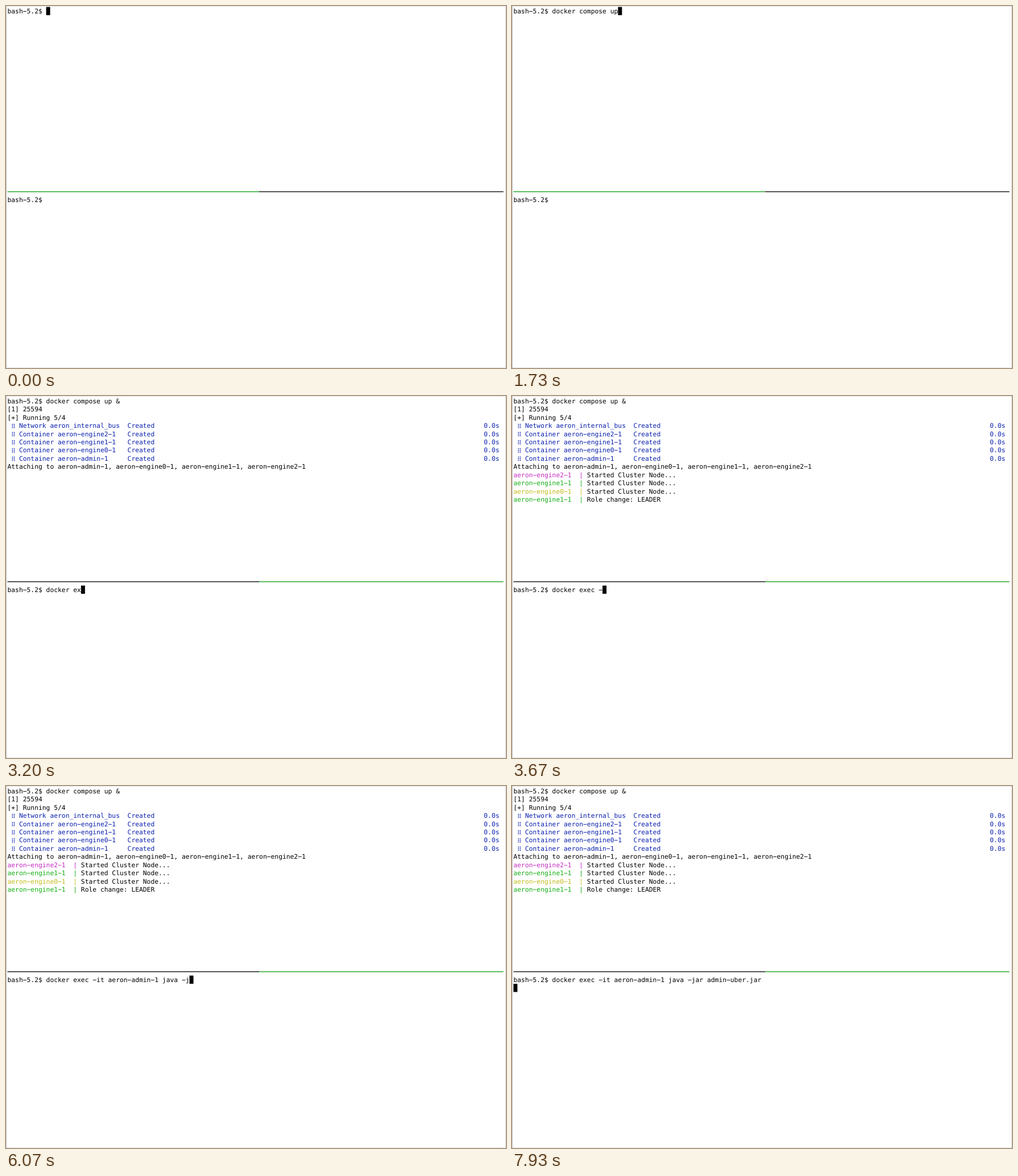
Recreate the animation shown at these times as an HTML page with a canvas. Size 879 by 637 pixels, loop 8000 ms.

```html
<!DOCTYPE html>
<html lang="en">
<head>
<meta charset="utf-8">
<title>Terminal session</title>
<style>
html, body { margin: 0; width: 100%; height: 100%; overflow: hidden; background: #fff; }
canvas { display: block; }
</style>
</head>
<body>
<canvas id="stage" width="879" height="637"></canvas>
<script>
const ctx = document.getElementById('stage').getContext('2d');
const W = 879, H = 637, LOOP = 8000, TICK = 200 / 3;
const LEFT = 2.5, TOP = 1.7, COL = 6.809, ROW = 14.43;
const SPLIT_ROW = 23;
const BLACK = '#000', BLUE = '#0a20ae', GREEN = '#14ae14',
      YELLOW = '#c3bb1c', MAGENTA = '#c52cc3';
const PROMPT = 'bash-5.2$ ';

// Typing bursts as [first tick, number of keys]; a key takes 1.5 ticks.
const upper = {
  text: 'docker compose up &',
  bursts: [[2, 13], [22, 6]]
};
const lower = {
  text: 'docker exec -it aeron-admin-1 java -jar admin-uber.jar',
  bursts: [[35, 1], [37, 1], [39, 9], [53, 8], [65, 7], [76, 19], [105, 9]]
};
const AT = { enter: 31, swap: 34, created: 38, started: 52, leader: 55, run: 119 };

const parts = [
  ['Network aeron_internal_bus'],
  ['Container aeron-engine2-1'],
  ['Container aeron-engine1-1'],
  ['Container aeron-engine0-1'],
  ['Container aeron-admin-1']
].flat();
const nodes = [
  ['aeron-engine2-1', MAGENTA],
  ['aeron-engine1-1', GREEN],
  ['aeron-engine0-1', YELLOW]
];

function box(x, y, w, h, color) {
  ctx.fillStyle = color;
  ctx.fillRect(x, y, w, h);
}

function write(text, col, row, color = BLACK) {
  ctx.fillStyle = color;
  const y = TOP + row * ROW + 11.2;
  [...text].forEach((ch, i) => {
    // The minus glyph gives the long terminal dash.
    if (ch !== ' ') ctx.fillText(ch === '-' ? '\u2212' : ch, LEFT + (col + i) * COL, y);
  });
}

function cursor(col, row) {
  box(LEFT + col * COL, TOP + row * ROW, COL + 0.2, ROW, BLACK);
}

function dots(row) {
  for (let i = 0; i < 6; i++) {
    box(10.6 + (i % 2) * 3.2, TOP + row * ROW + 4 + (i >> 1) * 2.8, 1.6, 1.6, BLUE);
  }
}

function typed({ text, bursts }, tick) {
  let n = 0;
  for (const [start, keys] of bursts) {
    for (let i = 0; i < keys; i++) {
      if (start + Math.floor(i * 1.5) <= tick) n++;
    }
  }
  return PROMPT + text.slice(0, n);
}

function logLine([name, color], message, row) {
  write(name + '  |', 0, row, color);
  write(message, 19, row);
}

function drawFrame() {
  box(0, 0, W, H, '#fff');
  box(0, 0, W, 1, '#e4e4e4');
  box(0, H - 1, W, 1, '#e4e4e4');
  box(0, 0, 1, H, '#bcbcbc');
  box(W - 1, 0, 1, H, '#d2d2d2');
}

function drawSplit(swapped) {
  box(2.5, 326, 442.5, 1.5, swapped ? '#222' : '#2ea82e');
  box(445, 326, 429.5, 1.5, swapped ? '#2ea82e' : '#222');
}

function drawUpper(tick) {
  const line = typed(upper, tick);
  write(line, 0, 0);
  if (tick < AT.enter) {
    cursor(line.length, 0);
    return;
  }
  write('[1] 25594', 0, 1);
  if (tick < AT.created) {
    write(PROMPT, 0, 2);
    if (tick < AT.swap) cursor(PROMPT.length, 2);
    return;
  }
  write('[+] Running 5/4', 0, 2);
  parts.forEach((name, i) => {
    const row = 3 + i;
    dots(row);
    write(name, 3, row, BLUE);
    write('Created', 31, row, BLUE);
    write('0.0s', 123, row, BLUE);
  });
  write('Attaching to aeron-admin-1, aeron-engine0-1, aeron-engine1-1, aeron-engine2-1', 0, 8);
  if (tick >= AT.started) {
    nodes.forEach((node, i) => logLine(node, 'Started Cluster Node...', 9 + i));
  }
  if (tick >= AT.leader) logLine(nodes[1], 'Role change: LEADER', 12);
}

function drawLower(tick) {
  const line = typed(lower, tick);
  write(line, 0, SPLIT_ROW);
  if (tick >= AT.run) cursor(0, SPLIT_ROW + 1);
  else if (tick >= AT.swap) cursor(line.length, SPLIT_ROW);
}

function render() {
  const tick = Math.floor((performance.now() % LOOP + 3.5) / TICK);
  ctx.font = '11.31px "DejaVu Sans Mono", monospace';
  ctx.textBaseline = 'alphabetic';
  ctx.textRendering = 'geometricPrecision';
  drawFrame();
  drawSplit(tick >= AT.swap);
  drawUpper(Math.min(tick, 119));
  drawLower(Math.min(tick, 119));
  requestAnimationFrame(render);
}
render();
</script>
</body>
</html>
```
